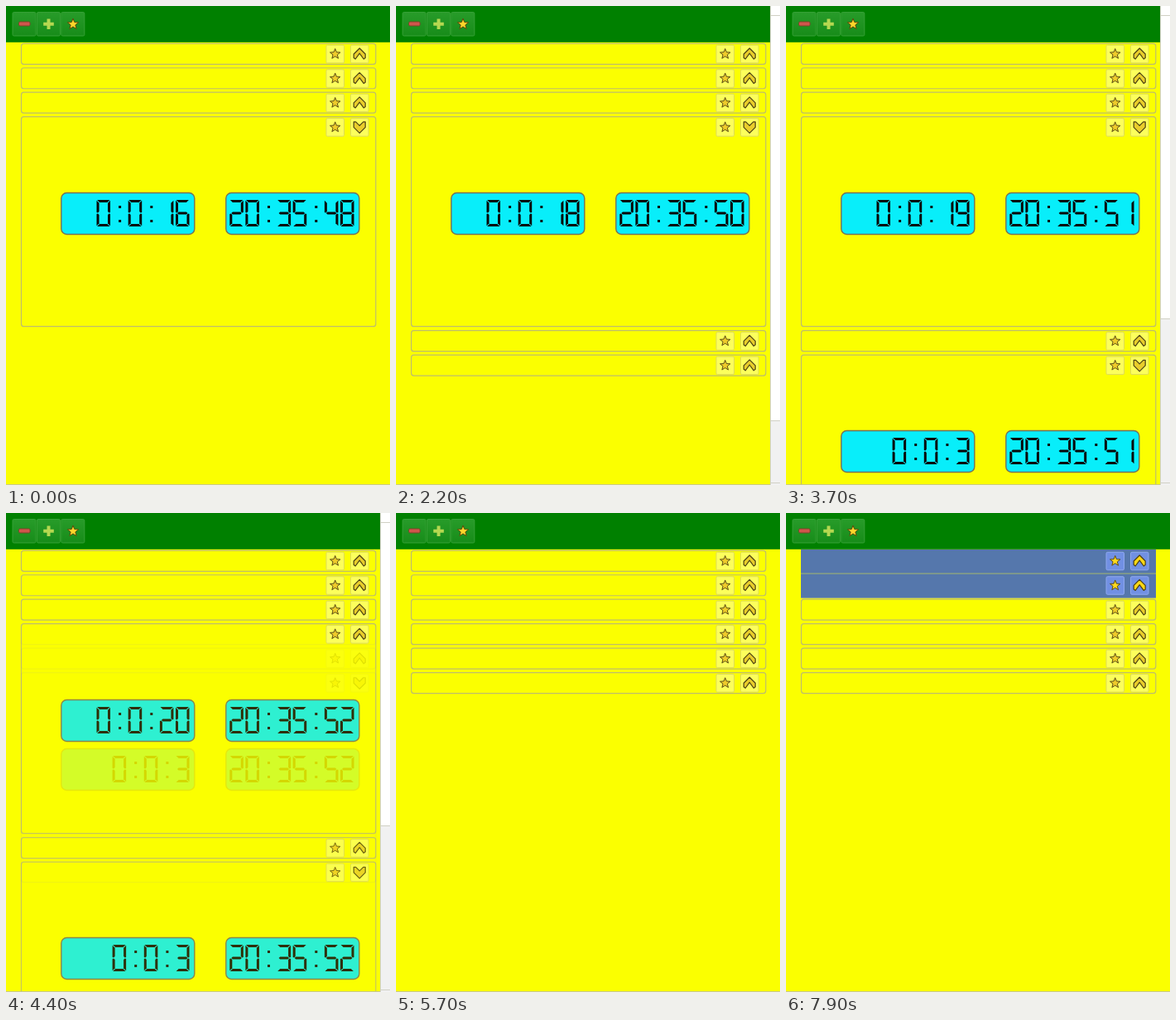
Recreate the animation shown at these times as an HTML page with a canvas. Size 464x578 px, loop 8000 ms.

```html
<!DOCTYPE html>
<html lang="en">
<head>
<meta charset="utf-8">
<title>Stopwatch list</title>
<style>
  html, body { margin: 0; width: 100%; height: 100%; overflow: hidden; background: #fbff00; }
  canvas { display: block; width: 464px; height: 578px; }
</style>
</head>
<body>
<canvas id="stage"></canvas>
<script>
const W = 464, H = 578, LOOP = 8000, BAR_X = 452;
const ratio = window.devicePixelRatio || 1;
const stage = document.getElementById('stage');
const layer = document.createElement('canvas');
for (const c of [stage, layer]) {
  c.width = W * ratio;
  c.height = H * ratio;
}
const out = stage.getContext('2d');
const g = layer.getContext('2d');

// at: start, open: expanded rows, thumb: scrollbar thumb end (0 = no bar)
const steps = [
  { at: 0,    rows: 4, open: [3],    up: [],  thumb: 0,   picked: 0 },
  { at: 1000, rows: 5, open: [3],    up: [],  thumb: 0,   picked: 0 },
  { at: 1400, rows: 6, open: [3],    up: [],  thumb: 500, picked: 0 },
  { at: 3200, rows: 6, open: [3, 5], up: [],  thumb: 377, picked: 0 },
  { at: 4350, rows: 6, open: [3, 5], up: [3], thumb: 377, picked: 0 },
  { at: 4370, rows: 6, open: [5],    up: [],  thumb: 500, picked: 0, fade: 200 },
  { at: 5600, rows: 6, open: [],     up: [],  thumb: 0,   picked: 0 },
  { at: 6900, rows: 6, open: [],     up: [],  thumb: 0,   picked: 1 },
  { at: 7700, rows: 6, open: [],     up: [],  thumb: 0,   picked: 2 }
];

function box(x, y, w, h, r, fill, stroke, line = 1) {
  g.beginPath();
  g.roundRect(x, y, w, h, r);
  paint(fill, stroke, line);
}

function paint(fill, stroke, line = 1) {
  if (fill) { g.fillStyle = fill; g.fill(); }
  if (stroke) { g.strokeStyle = stroke; g.lineWidth = line; g.stroke(); }
}

function poly(x, y, pts) {
  g.beginPath();
  for (let i = 0; i < pts.length; i += 2) g.lineTo(x + pts[i], y + pts[i + 1]);
  g.closePath();
}

function star(x, y, r, fill, stroke) {
  const pts = [];
  for (let i = 0; i < 10; i++) {
    const a = -Math.PI / 2 + i * Math.PI / 5, d = i % 2 ? r * 0.43 : r;
    pts.push(d * Math.cos(a), d * Math.sin(a));
  }
  g.lineJoin = 'round';
  poly(x, y, pts);
  paint(fill, stroke);
}

const chevrons = {
  up: [0, -7, 7, 0, 7, 4.5, 5, 6, 0, -0.8, -5, 6, -7, 4.5, -7, 0],
  down: [0, 7, -7, 0, -7, -6.5, -4.5, -6.5, 0, -2, 4.5, -6.5, 7, -6.5, 7, 0]
};
function chevron(x, y, dir, fill) {
  g.lineJoin = 'round';
  poly(x, y, chevrons[dir]);
  paint(fill, '#4b4014', 1.2);
}

// Seven-segment digits
const segments = {
  a: [0.6, 0, 15.9, 0, 12.9, 3, 3.6, 3],
  b: [16.5, 0.8, 16.5, 15, 15, 15.6, 13.5, 14, 13.5, 3.8],
  c: [16.5, 17, 16.5, 31.2, 13.5, 28.2, 13.5, 18, 15, 16.4],
  d: [0.6, 32, 15.9, 32, 12.9, 29, 3.6, 29],
  e: [0, 17, 0, 31.2, 3, 28.2, 3, 18, 1.5, 16.4],
  f: [0, 0.8, 0, 15, 1.5, 15.6, 3, 14, 3, 3.8],
  g: [2, 16, 3.6, 14.5, 12.9, 14.5, 14.5, 16, 12.9, 17.5, 3.6, 17.5]
};
const digits = ['abcdef', 'bc', 'abged', 'abgcd', 'fgbc', 'afgcd', 'afgecd', 'abcf', 'abcdefg', 'abcdfg'];

function lcdText(text, right, y) {
  const pitch = 19.1;
  [...text].forEach((ch, i) => {
    const x = right - (text.length - 1 - i) * pitch;
    g.fillStyle = '#080808';
    if (ch === ':') {
      g.fillRect(x + 7.5, y + 7, 3, 3);
      g.fillRect(x + 7.5, y + 24, 3, 3);
    } else {
      for (const s of digits[ch]) { poly(x, y, segments[s]); g.fill(); }
    }
  });
}

function display(x, y, text, next, mix) {
  box(x + 0.8, y + 0.5, 161, 50, 6.5, '#08eefa', '#76705a', 1.4);
  if (mix) {
    g.globalAlpha = mix;
    lcdText(next, x + 139, y + 9);
    g.globalAlpha = 1 - mix;
  }
  lcdText(text, x + 139, y + 9);
  g.globalAlpha = 1;
}

function toolbar(width) {
  g.fillStyle = '#008000';
  g.fillRect(0, 0, width, 43.8);
  const shade = g.createLinearGradient(0, 7, 0, 36);
  shade.addColorStop(0, '#289c2a');
  shade.addColorStop(1, '#178c19');
  for (let i = 0; i < 3; i++) box(8 + i * 29.4, 7.5, 28, 28.5, 1.5, shade, '#36a036');
  box(15.5, 19, 13.5, 5, 1.5, '#d0564c', '#7a4426');
  g.beginPath();
  g.rect(45.2, 19.7, 12.6, 4);
  g.rect(49.5, 15.4, 4, 12.6);
  paint('#b5d850');
  star(81, 22, 7, '#ffd52a', '#594a0c');
}

function header(y, picked, dir) {
  const cy = y + 13;
  for (const x of [387, 416.5]) {
    box(x, cy - 10.7, 21.5, 21.5, 1.5, picked ? '#7190e3' : '#fcff5c', picked ? '#8fa8ee' : '#dedb5c');
  }
  star(397.7, cy, 6.5, picked ? '#ffd91c' : '#efcb2a', '#5b4c16');
  chevron(427.2, cy, dir, picked ? '#ffd814' : '#e9cd2b');
}

function row(i, y, s, t) {
  const open = s.open.includes(i), picked = i < s.picked;
  const h = open ? 253 : 25;
  if (picked) {
    g.fillStyle = '#5577ac';
    g.fillRect(18, y - 1, 429, 28.8);
    g.fillStyle = '#7d94b4';
    g.fillRect(18, y + 27.8, 429, 0.7);
  } else {
    box(18.5, y + 0.3, 428.3, h, 3, null, '#bebd6c', 1.2);
  }
  header(y, picked, open && !s.up.includes(i) ? 'down' : 'up');
  if (!open) return;
  const tick = Math.floor((t + 100) / 1000);
  const top = Math.round(y + 91.3);
  if (i === 3) {
    display(66, top, '0:0:' + (16 + tick));
  } else {
    const own = Math.max(0, (t - 600) / 1000), n = Math.floor(own);
    const mix = Math.max(0, (own - n - 0.88) / 0.12);
    display(66, top, '0:0:' + n, '0:0:' + (n + 1), mix);
  }
  display(265, top, '20:35:' + (48 + tick));
}

function scrollbar(thumb) {
  g.fillStyle = '#f1f1f1';
  g.fillRect(BAR_X, 0, W - BAR_X, H);
  g.fillStyle = '#ffffff';
  g.fillRect(BAR_X, 0, W - BAR_X, thumb);
  g.fillStyle = '#d0d0c4';
  g.fillRect(BAR_X, 11, W - BAR_X, 1);
  g.fillRect(BAR_X, thumb, W - BAR_X, 1);
  g.fillRect(BAR_X, 575, W - BAR_X, 1);
  g.fillRect(BAR_X, 0, 1, H);
}

function scene(s, t) {
  g.setTransform(ratio, 0, 0, ratio, 0, 0);
  g.fillStyle = '#fbff00';
  g.fillRect(0, 0, W, H);
  let y = 45;
  for (let i = 0; i < s.rows; i++) {
    row(i, y, s, t);
    y += s.open.includes(i) ? 258 : 29.45;
  }
  g.fillStyle = '#c9c98c';
  g.fillRect(0, 577, W, 1);
  toolbar(s.thumb ? BAR_X : W);
  if (s.thumb) scrollbar(s.thumb);
}

function show(s, t, alpha) {
  scene(s, t);
  out.globalAlpha = alpha;
  out.drawImage(layer, 0, 0);
}

const start = performance.now();
function frame() {
  const t = (performance.now() - start) % LOOP;
  const i = steps.findLastIndex(s => s.at <= t);
  const s = steps[i];
  const mix = s.fade ? Math.min(1, (t - s.at) / s.fade) : 1;
  if (mix < 1) show(steps[i - 1], t, 1);
  // The scrollbar jumps halfway through a fade
  const thumb = mix < 0.5 ? steps[i - 1].thumb : s.thumb;
  show({ ...s, thumb }, t, mix);
  requestAnimationFrame(frame);
}
frame();
</script>
</body>
</html>
```
